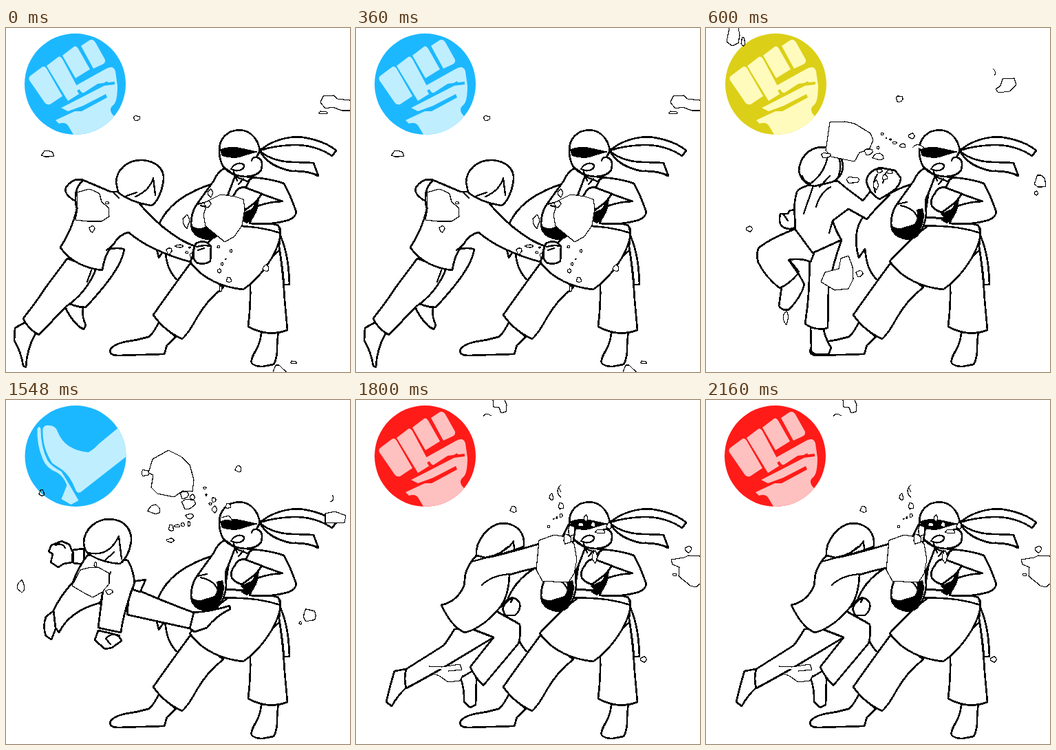
Write an HTML page with a canvas that moves like this. It is 500 px wide and 500 px high and loops after 2.4 s.

```html
<!DOCTYPE html>
<html lang="en">
<head>
<meta charset="utf-8">
<title>Sparring</title>
<style>
html, body { margin: 0; width: 100%; height: 100%; overflow: hidden; background: #fff; }
canvas { display: block; width: 500px; height: 500px; }
</style>
</head>
<body>
<canvas id="stage" width="500" height="500"></canvas>
<script>
const SIZE = 500;
const LOOP = 2400;
const ctx = document.getElementById('stage').getContext('2d');

// Every figure is a list of white shapes with an ink outline, plus loose strokes.
const defender = {
  shapes: [
    // back of the jacket
    'M302 226 C265 237 240 255 228 275 C216 292 216 312 222 334 L231 321 C233 343 238 357 250 367 L268 342 L305 300Z',
    // feet
    'M222 428 Q213 446 207 449 Q190 454 173 456 Q152 461 151 470 Q153 476 162 476 L230 474 L234 461 L247 449Z',
    'M372 434 Q371 455 364 467 Q355 482 357 487 Q361 492 373 492 L389 489 Q395 478 394 462 L396 436Z',
    // trousers
    'M268 342 Q245 373 214 417 Q230 440 256 452 Q265 444 277 422 Q293 394 316 377Z',
    'M355 371 Q356 400 352 434 Q380 450 409 439 L405 395 Q403 360 398 322 L350 370Z',
    // belt end
    'M398 299 L404 316 Q411 338 412 373 L404 373 Q402 348 397 318Z',
    // jacket
    'M303 302 L267 339 C285 365 315 377 345 380 C374 360 397 323 399 298 L398 290 Q365 282 325 286Z',
    'M315 276 Q355 274 396 287 L399 298 Q360 285 308 288Z',
    'M328 210 L318 275 Q350 276 362 280 L370 225 L358 218Z',
    // far sleeve
    'M356 217 Q385 219 404 226 Q414 244 422 268 Q420 276 411 279 Q385 287 354 284 L365 259 Q385 252 402 252 L348 233Z',
    'M348 232 Q337 230 333 240 Q325 250 328 258 Q332 265 343 268 L363 253 L372 241Z',
    // near forearm
    'M317 204 Q306 211 302 222 L279 254 C268 268 267 288 272 296 C280 306 294 309 304 304 Q318 293 320 270 L319 250 Q327 232 333 215 Q328 206 317 204Z',
    // ribbons
    'M369 178 Q392 159 425 158 Q460 162 480 178 L474 186 Q449 169 417 170 Q390 171 369 178Z',
    'M369 179 Q388 195 421 195 L447 196 L454 215 Q438 207 416 208 Q382 202 369 179Z',
    // head
    'M310 180 C309 160 322 149 339 148 C357 149 367 163 369 179 L364 188 Q375 190 371 206 Q365 216 348 216 Q325 215 315 200 Q310 190 310 180Z'
  ],
  strokes: 'M327 205 Q333 195 343 197 Q350 201 342 206 Q334 209 327 205 M319 204 L326 209 M331 209 L336 222 M336 217 L351 223 L358 218 M345 219 L338 227 M364 188 Q358 187 357 193 M283 258 Q303 262 308 277 L303 288 M303 268 L297 263 M278 256 L292 253',
  solids: [
    'M311 177 Q322 171 340 174 L367 180 Q350 184 340 188 Q325 190 314 186Z',
    'M270 287 Q279 294 290 289 L303 285 Q310 277 306 264 L315 262 Q321 281 306 302 Q290 311 274 301Z',
    'M341 270 L357 263 L364 252 L366 262 Q361 278 350 284 L341 279 L347 276Z'
  ]
};

const lunge = {
  shapes: [
    'M85 403 Q92 421 106 434 L113 438 L116 432 Q110 420 112 407 L96 390Z',
    'M146 322 Q165 318 172 322 C168 345 148 371 116 406 Q98 406 86 396Z',
    'M31 426 L13 436 L12 454 Q22 471 25 491 L29 493 Q30 467 43 444Z',
    'M89 335 L57 378 Q45 397 25 422 Q32 438 48 446 L87 405 Q117 385 131 350Z',
    'M112 221 Q97 217 87 232 Q84 241 98 250 L110 252 L125 230Z',
    'M163 238 L152 238 L112 221 Q96 236 103 263 Q96 293 79 319 C93 340 118 350 140 352 Q144 326 156 315 Q164 300 178 297 C199 315 232 330 268 340 L274 317 C243 306 211 276 193 254Z',
    'M276 313 Q289 306 298 317 L297 339 Q288 345 277 341 Q268 333 276 313Z',
    'M160 224 C161 205 177 191 199 192 C220 194 230 206 229 220 C227 239 218 256 211 258 Q181 253 163 239Z'
  ],
  strokes: 'M188 245 Q209 236 214 218 L217 243 M175 244 L190 239 M146 323 L156 315 M124 352 L118 369 M277 318 Q288 315 296 317 M279 323 L288 320 M156 239 L164 247',
  splashes: [
    'M103 239 L121 234 Q130 237 136 241 L139 253 L149 261 L150 274 L139 281 L119 281 L101 279 L104 263Z',
    'M294 251 L312 242 L333 245 L345 249 L347 262 L343 287 L332 303 L318 311 L307 302 L290 288 L287 271Z',
    'M500 105 L482 103 L476 98 L461 99 L457 108 L464 117 L475 115 L488 120 L500 120',
    'M388 500 L392 490 L397 490 L403 496 L408 500'
  ],
  blobs: [[61, 183, 10, 5], [190, 131, 5, 4], [461, 123, 7, 2], [125, 292, 4, 5], [147, 254, 3, 2], [262, 281, 5, 10], [297, 240, 4, 6], [293, 256, 5, 5], [309, 318, 2, 2], [327, 324, 2, 2], [314, 343, 2, 2], [324, 366, 4, 4], [310, 353, 3, 3], [319, 336, 1, 1], [378, 349, 5, 5], [237, 324, 4, 5], [252, 317, 7, 2], [263, 326, 2, 2], [269, 330, 2, 3], [267, 319, 2, 1], [312, 379, 2, 5], [418, 486, 5, 2]]
};

const uppercut = {
  shapes: [
    'M152 434 L153 463 Q151 473 160 474 L178 474 L182 465 Q173 451 170 434Z',
    'M150 326 Q152 382 144 430 Q160 441 177 436 L178 378 Q184 344 197 308Z',
    'M110 376 L106 404 Q112 412 121 409 Q138 391 143 373 L133 354Z',
    'M130 292 Q97 304 77 319 Q72 328 76 341 Q88 364 107 378 Q120 373 134 357 L120 337 Q139 334 152 340 L158 325Z',
    'M131 265 Q121 263 119 270 L108 270 Q105 282 110 288 Q120 295 130 290Z',
    'M155 227 Q137 231 132 238 Q127 255 129 274 L130 293 L155 327 L197 308 Q189 296 184 280 L207 263 L234 278 Q246 262 267 243 L240 236 L228 251 L203 232 L191 222Z',
    'M233 223 Q235 208 253 203 L275 207 L283 218 Q283 231 264 242 L252 249 Q237 240 233 223Z',
    'M135 208 C136 190 148 174 168 173 C187 174 199 185 199 202 Q198 217 183 224 L157 230 Q139 226 135 208Z'
  ],
  strokes: 'M140 215 Q143 224 152 226 Q173 211 177 185 M177 184 L192 187 Q199 201 191 219 M180 215 L165 231 M155 232 L142 270 M181 231 Q166 239 160 260 M184 280 L179 298 M112 270 L119 280 M249 213 Q241 223 246 239 M261 211 L257 225 M121 337 L135 354',
  splashes: [
    'M180 137 L202 136 L216 139 L239 153 L243 163 L237 177 L223 181 L216 194 L201 191 L182 187 L174 178Z',
    'M173 355 L193 350 L196 335 L207 331 L213 347 L214 365 L207 379 L187 381 L167 369Z',
    'M34 0 L30 20 L38 26 L47 22 L49 10 L47 0',
    'M421 89 L428 84 L431 74 L448 73 L451 83 L441 92 L425 94Z',
    'M417 59 Q423 64 419 69',
    'M300 174 Q307 165 318 175'
  ],
  blobs: [[54, 20, 3, 7], [281, 103, 5, 5], [299, 157, 5, 4], [286, 171, 5, 3], [274, 167, 3, 2], [256, 154, 2, 2], [262, 160, 1, 1], [268, 162, 2, 1], [250, 174, 2, 2], [236, 180, 6, 5], [251, 187, 9, 5], [213, 221, 10, 5], [174, 185, 7, 4], [247, 228, 4, 7], [260, 217, 4, 4], [267, 209, 5, 3], [252, 208, 4, 3], [63, 292, 5, 4], [223, 357, 5, 5], [116, 421, 4, 10], [486, 223, 9, 10], [480, 240, 3, 3]]
};

const kick = {
  shapes: [
    'M271 309 Q296 308 325 299 L326 304 Q306 313 292 331 L274 337 L266 331Z',
    'M180 271 Q224 291 273 309 L267 332 L176 312Z',
    'M184 264 L203 261 L195 279 L183 275Z',
    'M71 305 L58 315 Q53 330 58 343 L66 348 L72 333 L74 310Z',
    'M99 263 Q79 284 69 306 L72 331 L77 338 Q92 307 136 295 L151 272Z',
    'M97 218 L113 216 L114 239 L98 237Z',
    'M66 211 L81 205 L92 210 L97 221 L96 236 L84 238 L76 243 L65 236 L68 224 L62 220Z',
    'M119 225 Q105 243 97 265 L114 279 L141 276 L134 331 L167 338 Q171 307 187 266 Q185 246 177 233Z',
    'M134 335 L129 349 L144 362 L154 360 L168 350 L164 343 L156 340Z',
    'M113 207 C114 187 131 173 151 173 C172 174 183 188 182 205 Q179 227 166 238 Q141 237 120 224 Q113 217 113 207Z'
  ],
  strokes: 'M120 222 Q149 229 164 198 L168 231 M144 233 L157 221 M152 250 Q146 262 142 276 M142 272 L137 297 M165 342 Q151 338 145 347 L152 355 M72 211 Q82 207 86 215 M187 265 L180 283',
  splashes: [
    'M236 73 L254 82 L267 94 L273 116 L271 133 L257 132 L244 141 L220 136 L211 127 L214 109 L207 106 L213 86Z',
    'M108 247 L119 244 L134 243 L150 252 L150 267 L140 279 L126 287 L111 279 L96 270Z',
    'M464 165 L478 162 L494 168 L492 178 L479 179 L464 178Z',
    'M474 138 Q479 145 471 148 M313 171 L324 168 L330 176'
  ],
  blobs: [[202, 106, 6, 5], [216, 159, 10, 7], [338, 100, 5, 5], [259, 138, 6, 6], [265, 151, 10, 8], [271, 141, 4, 4], [289, 128, 2, 2], [291, 138, 1, 2], [302, 145, 3, 4], [297, 151, 2, 2], [303, 159, 4, 5], [323, 154, 4, 4], [267, 169, 6, 4], [257, 181, 3, 3], [266, 180, 2, 4], [249, 183, 5, 2], [240, 186, 4, 5], [239, 204, 6, 3], [52, 135, 4, 5], [22, 271, 6, 9], [130, 239, 2, 4], [150, 279, 5, 4], [441, 313, 10, 10], [428, 324, 2, 2]]
};

const cross = {
  shapes: [
    'M174 391 L152 404 Q158 421 157 439 L166 447 L174 443 L175 408Z',
    'M204 307 L238 326 Q240 344 236 354 L185 415 Q173 403 166 388 L200 345 L170 334Z',
    'M73 391 L56 394 Q50 413 44 439 L52 445 Q60 430 74 417Z',
    'M143 333 Q134 349 127 357 L73 391 Q69 405 73 419 Q94 408 127 389 L200 345 L170 333Z',
    'M218 292 Q229 282 238 295 Q240 306 231 313 L217 313 L213 304Z',
    'M176 225 Q163 238 159 253 L157 270 Q147 293 124 298 Q139 330 158 338 Q183 332 207 304 Q222 287 223 254 Q245 247 267 243 L300 199 Q242 217 192 229Z',
    'M300 199 L309 181 L319 183 L316 206 L303 211Z',
    'M175 226 C173 207 191 179 216 179 C236 181 246 195 244 213 Q214 225 188 229Z'
  ],
  strokes: 'M190 229 Q220 221 229 205 L230 218 M211 221 L221 213 M168 235 L190 229 M183 269 Q197 255 223 253 M207 304 L221 292 M215 294 L228 288 L225 294 M170 334 L200 345',
  splashes: [
    'M266 204 L288 196 L305 199 L317 209 L321 232 L317 252 L309 265 L287 264 L271 263 L262 247Z',
    'M500 227 L483 226 L477 229 L458 232 L460 239 L470 243 L469 256 L486 270 L494 272 L500 267',
    'M199 0 L200 10 L208 11 L211 19 L218 17 L219 7 L216 0',
    'M106 387 L125 388 L151 384 L154 392 L134 394 M111 397 L121 401 L134 410 L151 408 L155 400 M185 24 Q188 17 197 23',
    'M298 123 Q288 132 298 142 M294 126 L298 134'
  ],
  blobs: [[229, 159, 5, 5], [284, 141, 3, 5], [298, 154, 4, 5], [298, 168, 2, 3], [292, 171, 1, 2], [287, 173, 1, 1], [280, 184, 2, 2], [307, 202, 6, 8], [313, 190, 5, 9], [334, 172, 3, 5], [327, 181, 5, 3], [345, 181, 4, 4], [355, 191, 8, 3], [368, 183, 4, 5], [347, 228, 4, 9], [483, 217, 5, 5], [418, 377, 5, 4], [463, 254, 3, 2]]
};

const fist = [
  'M34 76 Q32 72 36 69 L52 57 Q56 54 59 59 L82 99 L64 111 Q59 112 56 108Z',
  'M59 55 L76 42 Q79 40 82 45 L105 88 L106 96 L90 106Z',
  'M82 40 L99 27 Q102 25 105 30 L122 60 L101 73Z',
  'M109 26 L121 18 Q126 15 130 21 L144 46 Q145 51 140 53 L127 59Z',
  'M101 84 L144 60 Q156 53 159 63 L162 84 Q162 107 156 112 Q147 119 158 129 L134 160 L101 160 L91 143 Q87 136 77 139 L72 134 L100 121 L110 121 L147 101 L145 96 L112 113 L90 121 L78 115 L108 98Z'
];
const fistCreases = 'M105 90 Q109 98 114 96 L134 83 L158 80 M76 116 L148 79';
const foot = [
  'M53 42 Q55 36 62 37 Q71 37 74 45 Q80 60 91 67 Q104 75 119 76 Q127 72 134 64 L168 36 L182 76 L108 134 Q103 137 100 129 Q93 111 82 102 L67 92 Q52 70 53 42Z',
  'M45 42 Q48 36 50 42 Q50 69 60 88 Q65 96 80 104 Q90 120 105 146 L94 152 L80 144 L88 124 Q83 110 73 105 Q58 99 53 86 Q44 65 45 42Z'
];

const BLUE = ['#1cb8ff', '#bfeeff'];
const YELLOW = ['#dccf18', '#fffbbd'];
const RED = ['#ff1b18', '#ffc0c0'];

const poses = [
  { end: 600, attacker: lunge, icon: fist, colors: BLUE, shift: 0 },
  { end: 1170, attacker: uppercut, icon: fist, colors: YELLOW, shift: 1 },
  { end: 1800, attacker: kick, icon: foot, colors: BLUE, shift: 0.5 },
  { end: LOOP, attacker: cross, icon: fist, colors: RED, shift: 0 }
];

function outline(c, path, width, filled = true) {
  const shape = new Path2D(path);
  c.lineWidth = width;
  if (filled) c.fill(shape);
  c.stroke(shape);
}

function blobPath([x, y, rx, ry]) {
  const points = [];
  for (let i = 0; i < 9; i++) {
    const angle = i * Math.PI * 2 / 9;
    const r = 0.92 + 0.16 * Math.sin(i * 2.4 + x + y);
    points.push(`${x + rx * r * Math.cos(angle)} ${y + ry * r * Math.sin(angle)}`);
  }
  return `M${points.join('L')}Z`;
}

function drawFigure(c, figure) {
  figure.shapes.forEach(path => outline(c, path, 2.6));
  outline(c, figure.strokes, 2.2, false);
  c.fillStyle = '#000';
  (figure.solids || []).forEach(path => c.fill(new Path2D(path)));
  c.fillStyle = '#fff';
}

// Hard black-and-white pixels, as a brush without smoothing leaves them.
function harden(c) {
  const image = c.getImageData(0, 0, SIZE, SIZE);
  const data = image.data;
  for (let i = 0; i < data.length; i += 4) {
    data[i] = data[i + 1] = data[i + 2] = data[i] < 140 ? 0 : 255;
  }
  c.putImageData(image, 0, 0);
}

function drawInk(attacker) {
  const layer = document.createElement('canvas');
  layer.width = layer.height = SIZE;
  const c = layer.getContext('2d');
  c.fillStyle = '#fff';
  c.strokeStyle = '#000';
  c.lineCap = c.lineJoin = 'round';
  c.fillRect(0, 0, SIZE, SIZE);
  drawFigure(c, defender);
  drawFigure(c, attacker);
  attacker.splashes.forEach(path => outline(c, path, 1.1));
  attacker.blobs.forEach(blob => outline(c, blobPath(blob), 1.1));
  harden(c);
  return layer;
}

function drawIcon({ icon, colors: [base, light], shift }) {
  ctx.save();
  ctx.translate(shift, 0);
  ctx.beginPath();
  ctx.arc(100.5, 81.5, 73.5, 0, Math.PI * 2);
  ctx.fillStyle = base;
  ctx.fill();
  ctx.clip();
  ctx.fillStyle = light;
  icon.forEach(path => ctx.fill(new Path2D(path)));
  if (icon === fist) {
    ctx.strokeStyle = base;
    ctx.lineWidth = 4;
    ctx.stroke(new Path2D(fistCreases));
  }
  ctx.restore();
}

poses.forEach(pose => { pose.ink = drawInk(pose.attacker); });

let start;
let shown;
function render(now) {
  start ??= now;
  const time = (now - start) % LOOP;
  const pose = poses.find(p => time < p.end);
  if (pose !== shown) {
    shown = pose;
    ctx.fillStyle = '#fff';
    ctx.fillRect(0, 0, SIZE, SIZE);
    drawIcon(pose);
    ctx.globalCompositeOperation = 'multiply';
    ctx.drawImage(pose.ink, 0, 0);
    ctx.globalCompositeOperation = 'source-over';
  }
  requestAnimationFrame(render);
}
requestAnimationFrame(render);
</script>
</body>
</html>
```
